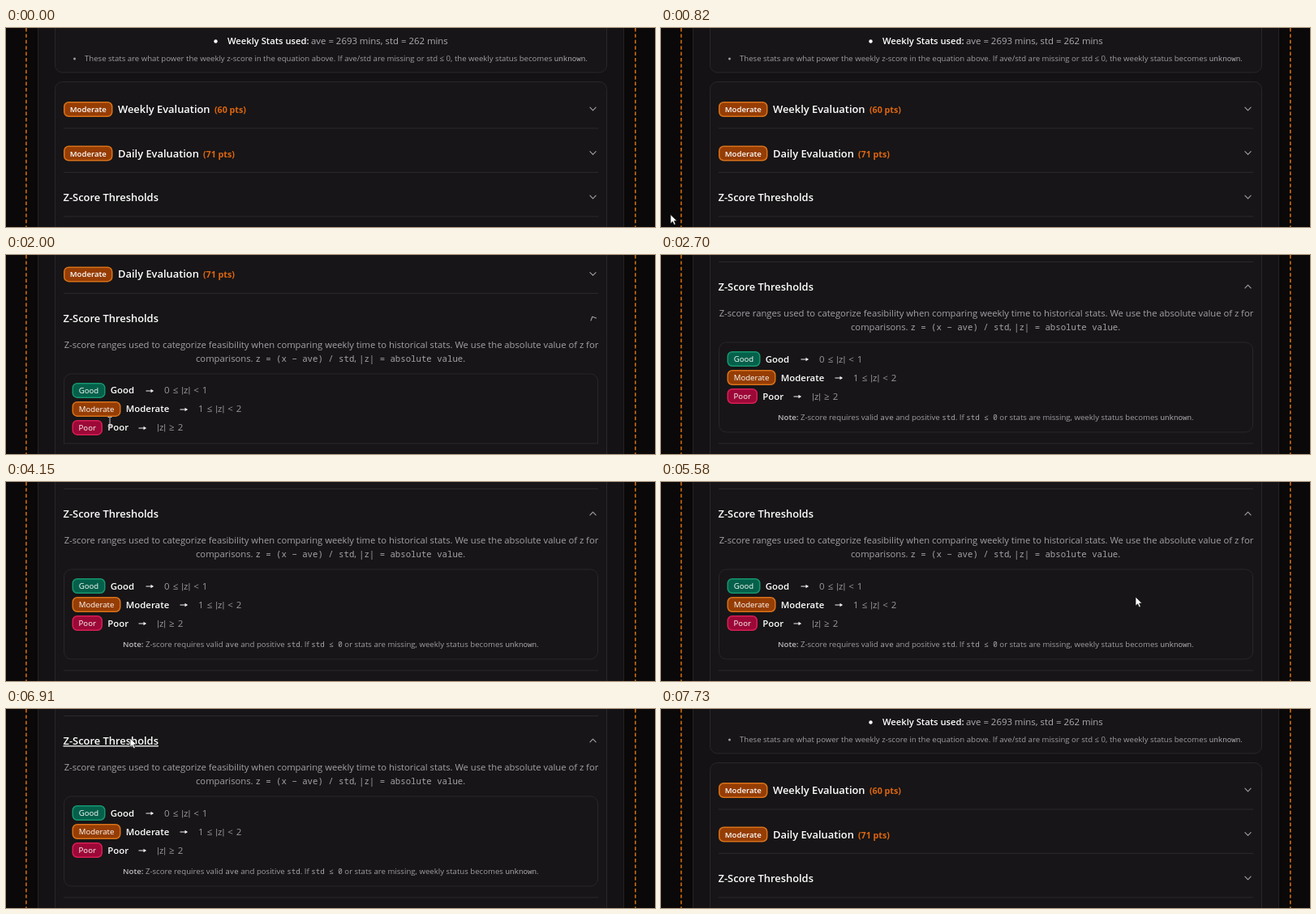
These frames come from a looping animation (800x246 px, 7.76 s). An HTML page:

```html
<!DOCTYPE html>
<html lang="en">
<head>
<meta charset="utf-8">
<title>Z-Score Thresholds</title>
<style>
  html, body { margin: 0; width: 100%; height: 100%; overflow: hidden; background: #0a0808; }
  svg { display: block; width: 800px; height: 246px; }
  text { font-family: "Open Sans", "Noto Sans", sans-serif; white-space: pre; fill: #a4a2a8; }
  .b { font-weight: 600; fill: #fff; }
  .h { font-size: 12.9px; }
  .p { font-size: 11.24px; }
  .s { font-size: 9.6px; fill: #9f9da3; }
  .pts { font-size: 10.7px; font-weight: 700; fill: #de660f; }
  .chip { font-size: 9.6px; fill: #fff; }
  .range { font-size: 11.5px; word-spacing: 1px; fill: #9a989e; }
  .bar { font-family: Roboto, sans-serif; }
  .m { font-family: "Noto Sans Mono", "DejaVu Sans Mono", monospace; }
  .p .m { font-size: 10.7px; }
  .s .m { font-size: 9.2px; fill: #a9a7ad; }
  .box { fill: #171517; stroke: #282629; }
  .line { stroke: #2a282b; }
  .dash { stroke: #cb6b0e; stroke-width: 1.6; stroke-dasharray: 4.44 2.96; }
  .chev { fill: none; stroke: #a1a0a6; stroke-width: 1.1; stroke-linecap: round; stroke-linejoin: round; }
  .arrow { fill: #f0eff2; }
  .hover { text-decoration: underline; text-underline-offset: 1.5px; }
</style>
</head>
<body>
<svg viewBox="0 0 800 246">
  <defs>
    <clipPath id="fold"><rect width="800" height="233"/></clipPath>
    <path id="chev" class="chev" d="M-3.6-1.8 0 1.8 3.6-1.8"/>
    <path id="arrow" class="arrow" d="M0-.55H6V-2.3L9.6 0 6 2.3V.55H0Z"/>
  </defs>
  <rect width="800" height="246" fill="#0a0808"/>
  <path class="dash" d="M24.9 0V246M775.8 0V246"/>
  <rect x="39.5" y="-5" width="722" height="260" fill="#141214" stroke="#242225"/>

  <g id="page">
    <rect class="box" x="60.5" y="-60" width="680" height="115" rx="9"/>
    <circle cx="258.5" cy="16.5" r="2.2" fill="#fff"/>
    <text class="b" x="273" y="20" font-size="11.2">Weekly Stats used:</text>
    <text x="376" y="20" font-size="11.4" style="fill:#aeacb2">ave = 2693 mins, std = 262 mins</text>
    <circle cx="84.5" cy="38" r="1.5" fill="#9f9da3"/>
    <text class="s" x="97" y="41">These stats are what power the weekly z-score in the equation above. If ave/std are missing or std ≤ 0, the weekly status becomes <tspan class="m">unknown</tspan>.</text>

    <rect class="box" x="60.5" y="66.5" width="680" height="500" rx="9"/>
    <g id="rows"></g>
    <path class="line" d="M71 124H730M71 178.5H730"/>
    <text id="head" class="b h" x="70.5" y="214.2">Z-Score Thresholds</text>
    <g transform="translate(723.5 209)"><use id="spin" href="#chev"/></g>
  </g>

  <g clip-path="url(#fold)">
    <g id="body">
      <text class="p" x="71.7" y="76">Z-score ranges used to categorize feasibility when comparing weekly time to historical stats. We use the absolute value of z for</text>
      <text class="p" x="234" y="93">comparisons. <tspan class="m">z = (x − ave) / std</tspan>, <tspan class="m">|z| = absolute value</tspan>.</text>
      <rect class="box" x="71.5" y="108" width="658" height="111" rx="9"/>
      <g id="levels"></g>
      <text class="s" x="144" y="204" style="font-size:9.64px"><tspan class="b" style="fill:#bfbdc3">Note:</tspan> Z-score requires valid <tspan class="m">ave</tspan> and positive <tspan class="m">std</tspan>. If <tspan class="m">std ≤ 0</tspan> or stats are missing, weekly status becomes <tspan class="m">unknown</tspan>.</text>
    </g>
  </g>
  <path class="line" d="M71 233H730"/>

  <g id="cursor">
    <path id="pointer" d="M0 0V11.2L2.6 8.8 4.4 12.8 6.3 12 4.6 8H8Z" fill="#fff" stroke="#111" stroke-width=".7"/>
    <path id="beam" d="M-2.5-5.5H-.6L0-5 .6-5.5H2.5M0-5V5M-2.5 5.5H-.6L0 5 .6 5.5H2.5" fill="none" stroke="#c9c7cb"/>
  </g>
</svg>
<script>
const $ = id => document.getElementById(id);
const LOOP = 7760, TRAVEL = 170, OPEN = 1884, CLOSE = 6913, FOLD = 200;

const palette = {
  Good: ['#04604a', '#17966f'],
  Moderate: ['#963d04', '#d9721a'],
  Poor: ['#9c0838', '#d81e55']
};

function chip(name, x, cy, w, weight) {
  const [fill, edge] = palette[name];
  return `<rect x="${x + .75}" y="${cy - 8.75}" width="${w - 1.5}" height="17.5" rx="5.5"
      fill="${fill}" stroke="${edge}" stroke-width="1.5"/>
    <text class="chip" x="${x + w / 2}" y="${cy + 3.5}" text-anchor="middle" font-weight="${weight}">${name}</text>`;
}

$('rows').innerHTML = [
  ['Weekly Evaluation', '(60 pts)', 257, 100.5],
  ['Daily Evaluation', '(71 pts)', 243, 155]
].map(([title, pts, x, cy]) => chip('Moderate', 71, cy, 60.5, 600) +
  `<text class="b h" x="138" y="${cy + 4.5}">${title}</text>
   <text class="pts" x="${x}" y="${cy + 4.5}">${pts}</text>
   <use href="#chev" x="723.5" y="${cy - .5}"/>`).join('');

const absZ = '<tspan class="bar">|</tspan>z<tspan class="bar">|</tspan>';
$('levels').innerHTML = [
  ['Good', 41, 172.5, 128.5, `0 ≤ ${absZ} &lt; 1`],
  ['Moderate', 60, 214.5, 151.5, `1 ≤ ${absZ} &lt; 2`],
  ['Poor', 37.5, 163.5, 174.5, `${absZ} ≥ 2`]
].map(([name, w, x, cy, range]) => chip(name, 81.5, cy, w, 500) +
  `<text class="b" x="${87.8 + w}" y="${cy + 4}" font-size="11.4">${name}</text>
   <use href="#arrow" x="${x}" y="${cy + .5}"/>
   <text class="range" x="${x + 22.6}" y="${cy + 4}">${range}</text>`).join('');

function bezier(x1, y1, x2, y2) {
  const at = (a, b, s) => 3 * a * s * (1 - s) ** 2 + 3 * b * s * s * (1 - s) + s ** 3;
  return x => {
    if (x <= 0 || x >= 1) return x <= 0 ? 0 : 1;
    let lo = 0, hi = 1;
    for (let i = 0; i < 24; i++) {
      const mid = (lo + hi) / 2;
      if (at(x1, x2, mid) < x) lo = mid; else hi = mid;
    }
    return at(y1, y2, lo);
  };
}
const easeOut = bezier(0, 0, .58, 1);
const easeTurn = bezier(.4, 0, .2, 1);
const easeHand = bezier(.4, 0, .3, 1);

const opened = (t, ease) => ease((t - OPEN) / FOLD) - ease((t - CLOSE) / FOLD);

// Pointer moves: start, end, from x, y, to x, y
const moves = [
  [640, 1390, -14, 236, 128, 206],
  [2120, 2610, 128, 206, 112, 264],
  [4100, 4520, 640, 264, 585, 142],
  [5580, 6330, 585, 142, 153, 36],
  [7120, 7610, 153, 36, 190, -20]
];

function pointerAt(t) {
  const move = moves.filter(m => t >= m[0]).pop();
  if (!move) return [-30, -30];
  const [a, b, x0, y0, x1, y1] = move;
  const k = easeHand((t - a) / (b - a));
  return [x0 + (x1 - x0) * k, y0 + (y1 - y0) * k];
}

function draw(t) {
  const p = opened(t, easeOut);
  const [x, y] = pointerAt(t);
  const shift = TRAVEL * p;
  $('page').setAttribute('transform', `translate(0 ${-shift})`);
  $('body').setAttribute('transform', `translate(0 ${TRAVEL - shift})`);
  $('spin').setAttribute('transform', `rotate(${180 * opened(t, easeTurn)})`);

  const onHead = x > 71 && x < 730 && Math.abs(y - (210 - shift)) < 20;
  $('head').classList.toggle('hover', onHead);

  const onText = p > .5 ? (y > 62 && y < 100) || (y > 195 && x < 200) : y < 60;
  $('cursor').setAttribute('transform', `translate(${x} ${y})`);
  $('pointer').setAttribute('visibility', onText ? 'hidden' : 'visible');
  $('beam').setAttribute('visibility', onText ? 'visible' : 'hidden');
}

const start = performance.now();
function tick() {
  draw((performance.now() - start) % LOOP);
  requestAnimationFrame(tick);
}
tick();
</script>
</body>
</html>
```
